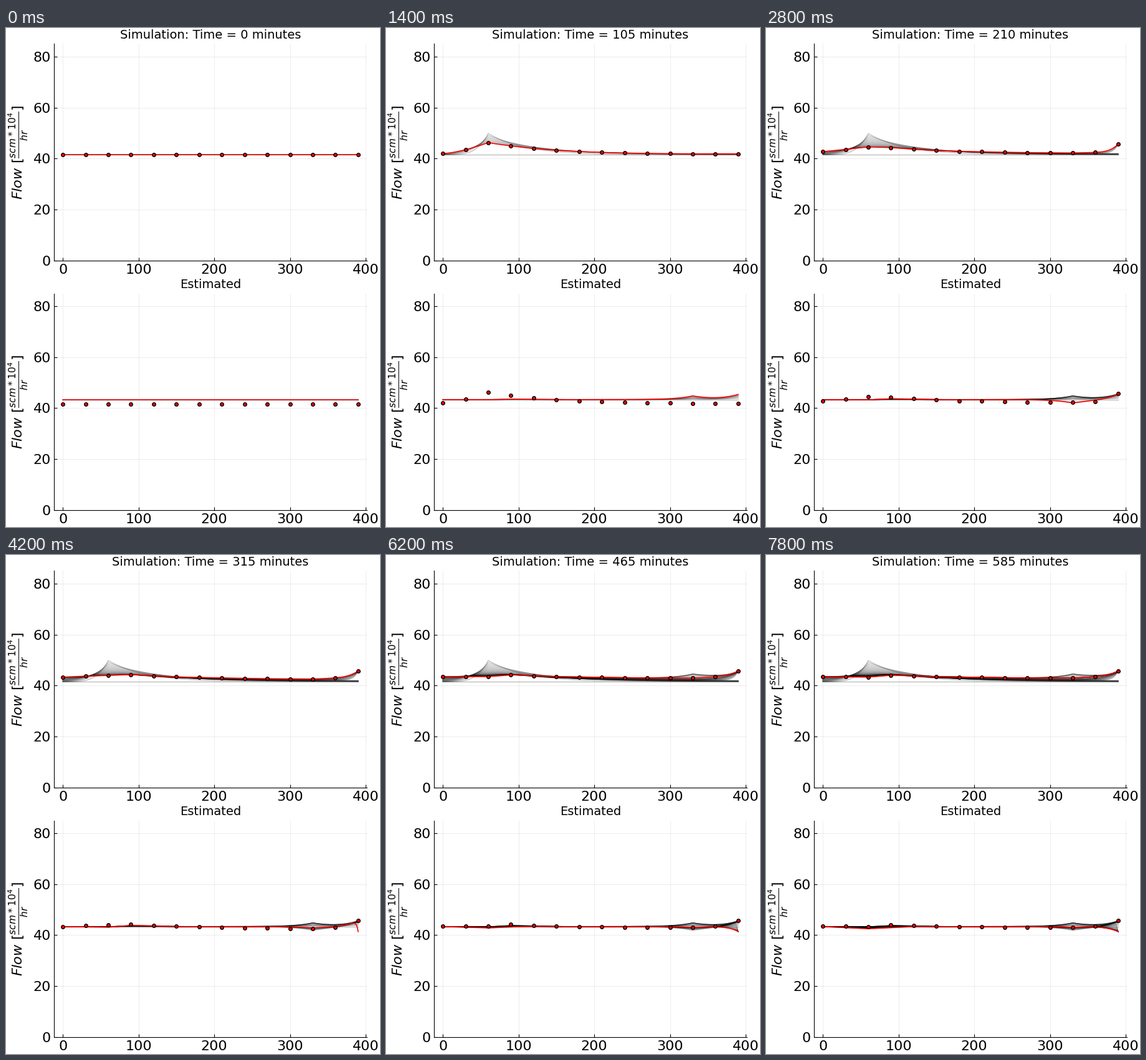
Recreate the animation shown at these times as a matplotlib script. Size 600 by 800 pixels, loop 8 s.

```python
import numpy as np
import matplotlib.pyplot as plt
from matplotlib.animation import FuncAnimation

W, H, DPI = 600, 800, 100
FRAMES, INTERVAL, STEP = 40, 200, 15

plt.rcParams["font.family"] = "DejaVu Sans"
plt.rcParams["mathtext.fontset"] = "dejavusans"

pipe = np.arange(391.0)
sensors = np.arange(0, 391, 30)
tail = np.clip((pipe - 330) / 60, 0, 1)


def peak(at, left, right):
    """Pointed bump of height one with exponential flanks."""
    d = pipe - at
    return np.exp(-np.abs(d) / np.where(d < 0, left, right))


def tent(at, left, right):
    return np.interp(pipe, [at - left, at, at + right], [0, 1, 0])


def settle(n, start, tau):
    """Decay from one that begins at the given frame."""
    return np.exp(-(n - start) / tau)


outlet = peak(330, 22, 30)
steady = np.interp(pipe, [0, 60, 90, 150, 270, 330, 360],
                   [1.95, 1.7, 2.5, 1.95, 1.5, 1.45, 1.95])


def simulated(n):
    if n == 0:
        return np.full_like(pipe, 41.5)
    # The line fills towards its steady level, the inlet end first.
    fill = np.sin(np.pi / 2 * np.minimum(n / (26 + pipe / 39), 1)) ** 1.5
    flow = 41.5 + steady * fill
    # A surge at 60 widens as it dies away.
    rise = np.clip(pipe / 60, 0, 1) ** (4 / np.sqrt(n))
    fall = np.exp(-np.maximum(pipe - 60, 0) / (75 * (1 - np.exp(-n))))
    flow += 9.3 * np.exp(-n / 9.3) * rise * fall
    if 21 < n < 30:
        flow += 1.7 * min((n - 21) / 5, 1) * outlet
    if n >= 10:
        flow += (45.7 - flow[-1]) * tail ** (4 + 6 * settle(n, 10, 3))
    return flow


def estimated(n):
    flow = np.full_like(pipe, 43.35)
    flow -= 0.9 * (n / FRAMES) ** 2 * tent(60, 60, 60)
    flow += np.interp(n, [0, 21, 26, 39], [0, 0.6, 0.2, 0]) * tent(90, 30, 60)
    if n < 13:
        flow += 1.45 * min(n / 7, 1) * outlet
    else:
        flow -= (0.3 + 1.2 * settle(n, 13, 5)) * outlet
    lift = 2.2 * (1 - np.exp(-n / 4))
    if n >= 21:
        lift *= settle(n, 21, 4)
        flow -= (1.9 + lift) * tail ** (4 + 26 * settle(n, 21, 3))
    return flow + lift * tail**3


def make_axes(fig, bottom, title):
    ax = fig.add_axes([76.95 / W, 1 - bottom / H, 502.2 / W, 347.4 / H])
    ax.set(xlim=(-11.7, 401.7), ylim=(0, 85),
           xticks=range(0, 401, 100), yticks=range(0, 81, 20))
    ax.tick_params(direction="in", labelsize=16)
    ax.spines[["top", "right"]].set_visible(False)
    ax.set_axisbelow(True)
    ax.grid(color="black", alpha=0.1, linewidth=0.5)
    ax.set_ylabel(r"$Flow\ [\frac{scm*10^4}{hr}]$", fontsize=16)
    ax.set_title(title, fontsize=14)
    return ax


fig = plt.figure(figsize=(W / DPI, H / DPI), dpi=DPI, facecolor="white")
panels = []
for bottom, title, model in [
    (372.9, "Simulation: Time = 0 minutes", simulated),
    (772.9, "Estimated", estimated),
]:
    ax = make_axes(fig, bottom, title)
    curves = [model(n) for n in range(FRAMES)]
    trails = [ax.plot(pipe, c, color="black", alpha=0.25, lw=1, zorder=2)[0]
              for c in curves]
    line, = ax.plot([], [], color="red", lw=1.2)
    dots, = ax.plot([], [], "o", ms=4, mfc="red", mec="black", mew=1, zorder=4)
    panels.append((ax, curves, trails, line, dots))


def draw(n):
    measured = simulated(n)[sensors]
    for ax, curves, trails, line, dots in panels:
        for i, trail in enumerate(trails):
            trail.set_visible(i < max(n, 1))
        line.set_data(pipe, curves[n])
        line.set_zorder(3 if n else 1.9)
        dots.set_data(sensors, measured)
    panels[0][0].set_title(f"Simulation: Time = {n * STEP} minutes", fontsize=14)
    return []


anim = FuncAnimation(fig, draw, frames=FRAMES, interval=INTERVAL,
                     init_func=lambda: draw(0), repeat=True, repeat_delay=0)
plt.show()
```
